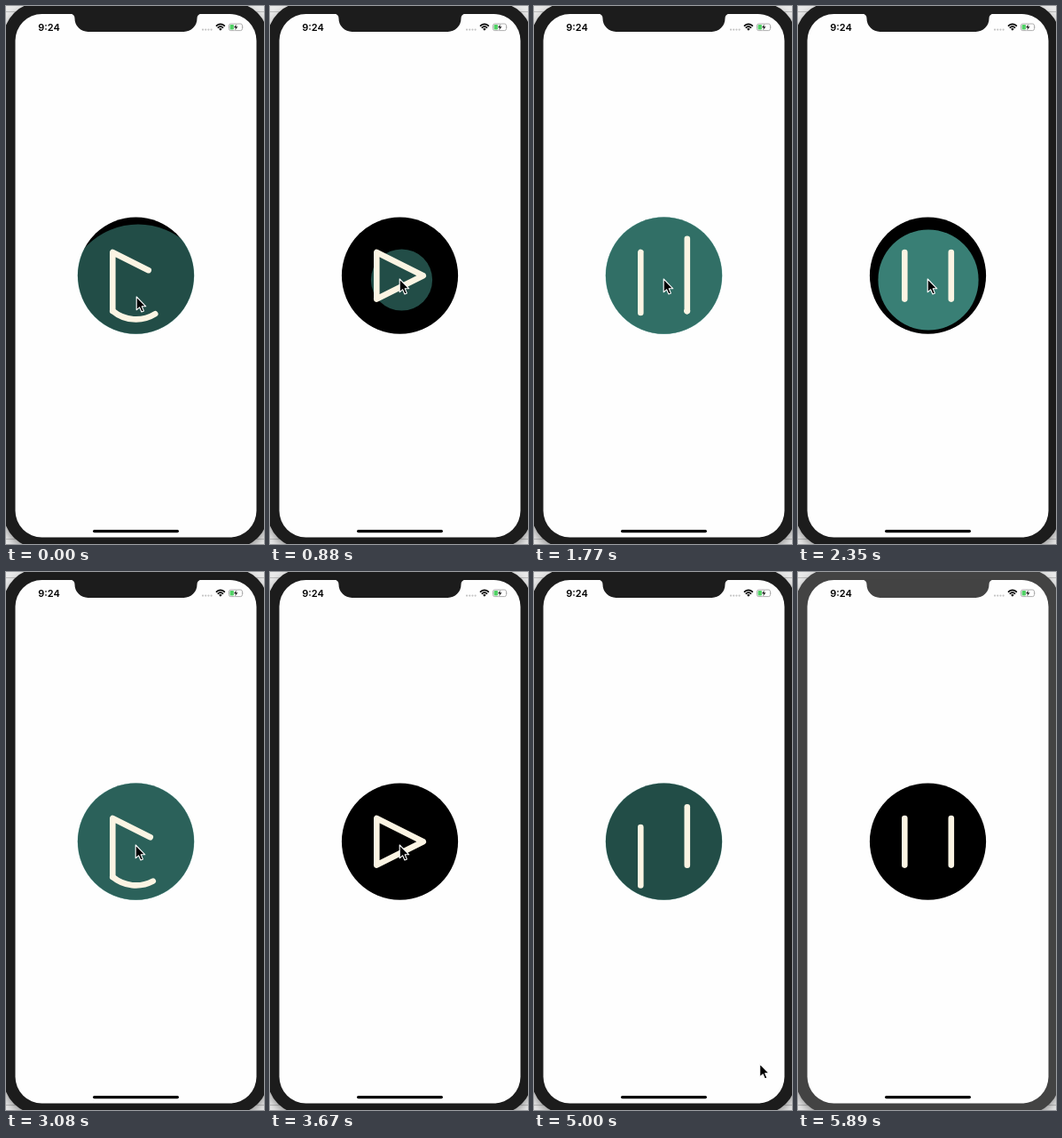
An HTML page for the animation above (5990 ms loop, 291 px wide and 605 px high).

```html
<!DOCTYPE html>
<html lang="en">
<head>
<meta charset="utf-8">
<title>Play / pause button</title>
<style>
  html, body { margin: 0; width: 100%; height: 100%; overflow: hidden; background: #e9e9e9; }
  svg { display: block; width: 291px; height: 605px; }
  .clock { font: 600 11px Inter, sans-serif; }
  .body { filter: drop-shadow(0 4px 5px rgba(0, 0, 0, .35)); }
  .icon path { fill: none; stroke: #fbf4e3; stroke-width: 6.6; stroke-linecap: round; stroke-linejoin: round; }
</style>
</head>
<body>
<svg viewBox="0 0 291 605">
  <defs>
    <clipPath id="disc"><circle cx="146.5" cy="303.1" r="65.9"/></clipPath>
  </defs>
  <rect width="291" height="605" fill="#e9e9e9"/>
  <path d="M0 6.5H291M0 599.5H291" stroke="#bdbdbd"/>
  <g id="phone" fill="#1c1c1c">
    <rect class="body" x="-3" y="-4" width="299" height="614" rx="41"/>
    <rect x="10.5" y="9" width="272" height="588.5" rx="30" fill="#fefefe"/>
    <path d="M72 8.5Q77.5 9 77.5 14A15 15 0 0 0 92.5 29H200.5A15 15 0 0 0 215.5 14Q215.5 9 221 8.5Z"/>
  </g>

  <text class="clock" x="36.3" y="27.7">9:24</text>
  <g fill="#c4c4c4">
    <circle cx="222" cy="26.6" r="1.1"/><circle cx="225.2" cy="26.6" r="1.1"/>
    <circle cx="228.4" cy="26.6" r="1.1"/><circle cx="231.6" cy="26.6" r="1.1"/>
  </g>
  <path d="M236.9 22.6Q241.9 18.2 246.9 22.6M238.7 24.6Q241.9 21.8 245.1 24.6" fill="none" stroke="#000" stroke-width="1.6"/>
  <path d="M240.1 25.8Q241.9 24.4 243.7 25.8L241.9 27.8Z"/>
  <rect x="251.5" y="20" width="15" height="7.6" rx="2" fill="#fff" stroke="#a5a5a5" stroke-width=".9"/>
  <rect x="252.6" y="21.1" width="4.4" height="5.4" rx=".8" fill="#4fd164"/>
  <path d="M267.6 22.4Q268.6 23.8 267.6 25.2Z" fill="#a5a5a5"/>
  <path d="M260.4 19.8L256.5 24.4H258.8L257.9 27.9L261.8 23.1H259.5Z" stroke="#fff" stroke-width=".5"/>
  <rect x="98" y="589" width="97" height="3.2" rx="1.6"/>

  <circle cx="146.5" cy="303.1" r="65.6"/>
  <g clip-path="url(#disc)"><circle id="ripple" fill="#52b7a9"/></g>
  <g class="icon">
    <path id="left" d="M120.3 329.5L172.8 303.2L120.3 277V375"/>
    <path id="arc" d="M120.3 342.9A41 41 0 0 0 172.8 342.9"/>
    <path id="right" d="M172.8 342.9V240"/>
  </g>
  <path id="cursor" d="M0 0V14.8L3.4 11.8L5.7 17L8.2 15.9L6 10.8H10.6Z"
        stroke="#fff" stroke-width="1.1" stroke-linejoin="round"/>
</svg>
<script>
const LOOP = 5990, STEP = 146.9;

// Distances along the stroke: triangle, left bar, arc, right bar.
const CORNER = 117.4, BAR = 170, ARC = 183.3, RISE = 240.3, TOP = 306.2;
const GAP = TOP - (BAR - CORNER);

// Each tap starts a morph; the ripple starts a little before it.
const TAPS = [
  { start: -719, fade: -500, x: 149, y: 327, play: true },
  { start: 974, fade: 1426, x: 148.5, y: 308, play: false },
  { start: 2362, fade: 2684, x: 147, y: 308, play: true },
  { start: 4144, fade: 4500, x: 143, y: 309, play: false }
];
const LEAD = 220, GROW = 300, FADE = 860, RADIUS = 81.5;
const MORPH = 1040, BACK = 2.8;
const DELAYS = {
  pause: { head: 0, tail: 132, gap: 194 },
  play: { gap: 0, head: 194, tail: 221 }
};

const $ = id => document.getElementById(id);
const clamp = v => Math.min(1, Math.max(0, v));
const lerp = (a, b, u) => a + (b - a) * u;
const inBack = x => x * x * ((BACK + 1) * x - BACK);
const inOutBack = u => u < 0.5 ? inBack(2 * u) / 2 : 1 - inBack(2 - 2 * u) / 2;

function glide(t, from, to) {
  const u = clamp((t - from) / (to - from));
  return u * u * (3 - 2 * u);
}

function set(id, attrs) {
  for (const name in attrs) $(id).setAttribute(name, attrs[name]);
}

function span(id, from, to) {
  const length = to - from;
  set(id, {
    "visibility": length > 0.1 ? "visible" : "hidden",
    "stroke-dasharray": `${Math.max(0, length)} 999`,
    "stroke-dashoffset": -from
  });
}

function drawRipple(t) {
  const tap = TAPS.findLast(p => t >= p.start - LEAD);
  const grow = clamp((t - tap.start + LEAD) / GROW);
  const fade = clamp((t - tap.fade) / FADE);
  set("ripple", { cx: tap.x, cy: tap.y, r: RADIUS * grow, opacity: grow * (1 - fade) });
}

function drawIcon(t) {
  const { start, play } = TAPS.findLast(p => t >= p.start);
  const delays = play ? DELAYS.play : DELAYS.pause;
  const pos = (part, a, b) => {
    const e = inOutBack(clamp((t - start - delays[part]) / MORPH));
    return lerp(a, b, play ? 1 - e : e);
  };
  const head = pos("head", BAR, TOP);
  const tail = Math.max(0, pos("tail", 0, CORNER));
  const gap = pos("gap", BAR, GAP);

  // Once the gap reaches the arc, the left bar runs straight and follows both overshoots.
  const split = gap > ARC;
  const foot = BAR + Math.max(0, head - TOP) + Math.max(0, tail - CORNER);
  const from = split ? gap : ARC;
  span("left", tail, split ? foot : Math.min(head, ARC));
  span("arc", from - ARC, Math.min(head, RISE) - ARC);
  span("right", Math.max(from, RISE) - RISE, head - RISE);
}

function drawCursor(t) {
  const out = glide(t, 4450, 4995);
  const x = 147.2 - glide(t, 200, 700) - 4 * glide(t, 3850, 4150) + 112.5 * out;
  const y = 327 - 20 * glide(t, 200, 700) + 246 * out + 60 * glide(t, 4995, 5400);
  set("cursor", { transform: `translate(${x} ${y})` });
}

function draw(t) {
  drawRipple(t);
  drawIcon(t);
  drawCursor(t);
  set("phone", { fill: t > 5800 ? "#434343" : "#1c1c1c" });
}

const begin = performance.now();
function tick() {
  const t = (performance.now() - begin) % LOOP;
  draw(Math.min(40, Math.floor((t + 15) / STEP)) * STEP);
  requestAnimationFrame(tick);
}
tick();
</script>
</body>
</html>
```
